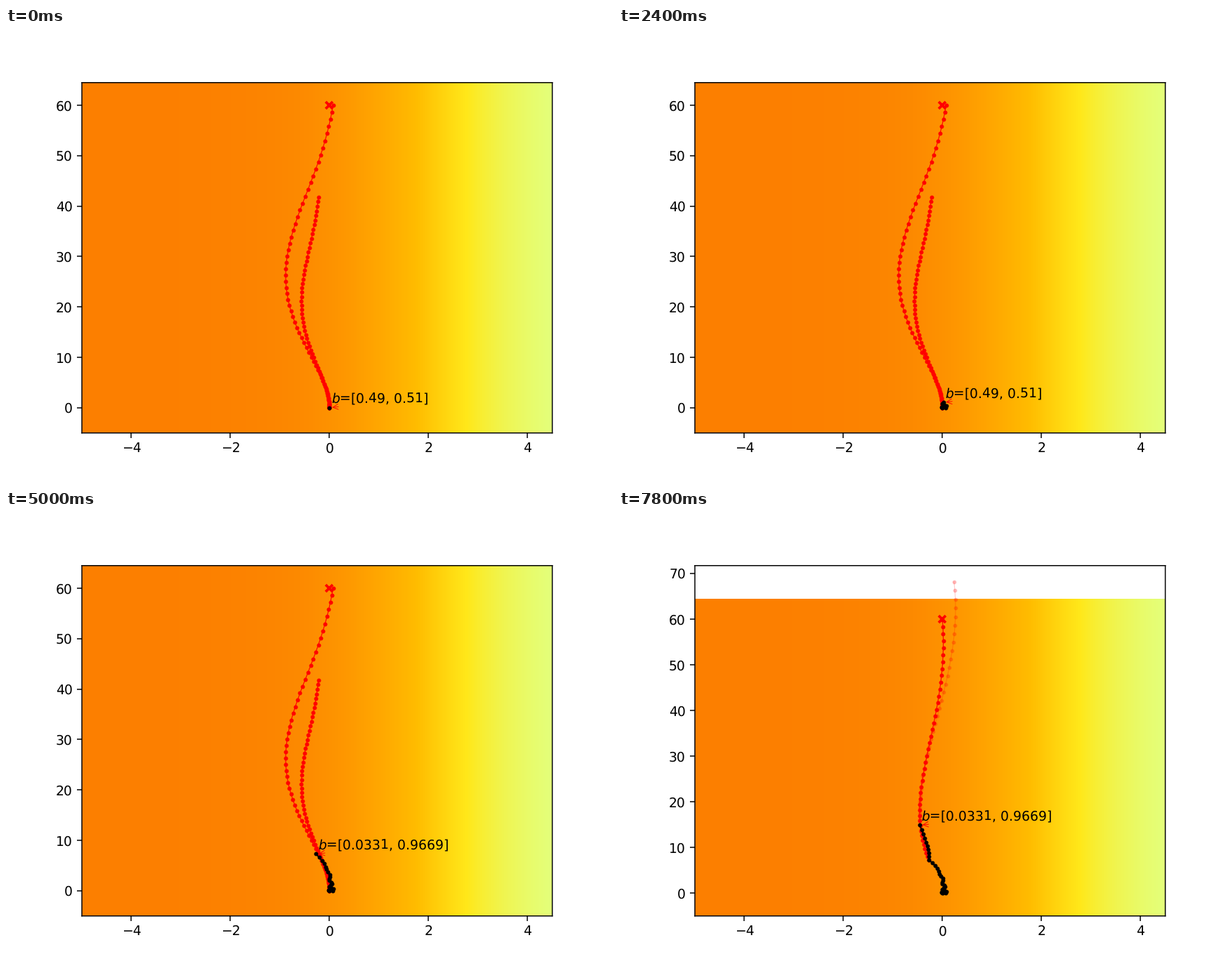
These frames come from a looping animation (864 px wide and 648 px high, 8 s). A matplotlib script:

```python
import numpy as np
import matplotlib.pyplot as plt
from matplotlib.animation import FuncAnimation

FRAMES, INTERVAL = 40, 200
START, REPLAN, RESUME = 4, 26, 9   # frame offsets of the three phases
SWITCH, LAST = 21, 30              # step of the belief change, last step walked

plt.rcParams.update({"text.hinting": "no_hinting", "path.snap": False})


def climb(steps, speed, tau, lead=0):
    """Distance covered while the speed rises as speed * tanh((t + lead) / tau)."""
    t = (np.arange(steps + 1) + lead) / tau
    dist = np.log(np.cosh(t))
    return speed * tau * (dist - dist[0])


def bend(dist, keys, power):
    """Sideways offset dist**power * cubic, passing through four (dist, offset) keys."""
    d, off = np.array(keys).T
    return dist**power * np.polyval(np.polyfit(d, off / d**power, 3), dist)


def plan(start, dist, keys, power):
    return start[0] + bend(dist, keys, power), start[1] + dist


def walk(s):
    """Agent position: steady acceleration upwards, weaving at first."""
    drift = -0.3 * np.minimum(s / SWITCH, 1)**5
    drift -= 0.19 * np.maximum((s - SWITCH) / (LAST - SWITCH), 0)**2
    weave = 0.055 * np.cos(2 * np.pi * (s - 5) / 4.3) * np.exp(-(s / 12)**2)
    return np.array([drift + np.tanh(s) * (0.03 + weave), s**2 / 60.5])


trail = walk(np.arange(LAST + 1.0))
origin, turn = (0, 0), trail[:, SWITCH]

first_plan = [
    plan(origin, climb(61, 1.475, 30),
         [(12.1, -.474), (26, -.885), (42.3, -.474), (60.3, .08)], 2),
    plan(origin, climb(61, .925, 23),
         [(11.1, -.367), (21.7, -.566), (32.8, -.382), (41.5, -.226)], 2),
]
second_plan = [
    plan(turn, climb(40, 2.02, 27, 10),
         [(5, -.146), (17, -.149), (38.6, .336), (60.7, .506)], 1),
    plan(turn, climb(40, 1.55, 20, 10),
         [(5, -.146), (15.5, -.16), (37.3, .216), (52.5, .271)], 1),
]

fig, ax = plt.subplots(figsize=(6.4, 4.8), dpi=135)

# Cost field: a logistic slope across x
x = np.linspace(-5, 4.5, 670)
cost = 1 / (1 + np.exp((x - 1.95) / 1.05))
ax.imshow(np.tile(cost, (2, 1)), cmap="Wistia", extent=(-5, 4.5, -5, 64.5),
          aspect="auto", origin="lower")
ax.set_xlim(-5, 4.5)

dots = dict(marker=".", ms=4.3)
plans = [ax.plot([], [], color="r", lw=0.6, zorder=3, **dots)[0] for _ in range(2)]
ax.plot([0], [60], "rx", ms=5, mew=2, zorder=3)
walked, = ax.plot([], [], color="k", lw=1, zorder=4, **dots)
label = ax.text(0, 0, "", fontsize=10, zorder=6)
arrow = ax.annotate("", xy=origin, xytext=origin, zorder=5,
                    arrowprops=dict(arrowstyle="->", color="r", lw=0.5,
                                    mutation_scale=10, shrinkA=0, shrinkB=2))


def update(k):
    replanned = k >= REPLAN
    step = max(SWITCH, k - RESUME) if replanned else min(max(k - START, 0), SWITCH)

    for line, path in zip(plans, second_plan if replanned else first_plan):
        line.set_data(*path)
    plans[0].set_alpha(0.2 if replanned else 1)
    ax.set_ylim(-5, 71.73 if replanned else 64.5)

    walked.set_data(*trail[:, :step + 1])
    px, py = trail[:, step]
    arrow.xy = (px, py)
    arrow.set_position((px + 0.18, py + 0.2))
    label.set_position((px + 0.035, py + 1))
    belief = "0.0331, 0.9669" if step >= SWITCH else "0.49, 0.51"
    label.set_text(f"$b$=[{belief}]")
    return [*plans, walked, arrow, label]


anim = FuncAnimation(fig, update, frames=FRAMES, interval=INTERVAL,
                     init_func=lambda: update(0), repeat=True, repeat_delay=0)
plt.show()
```
